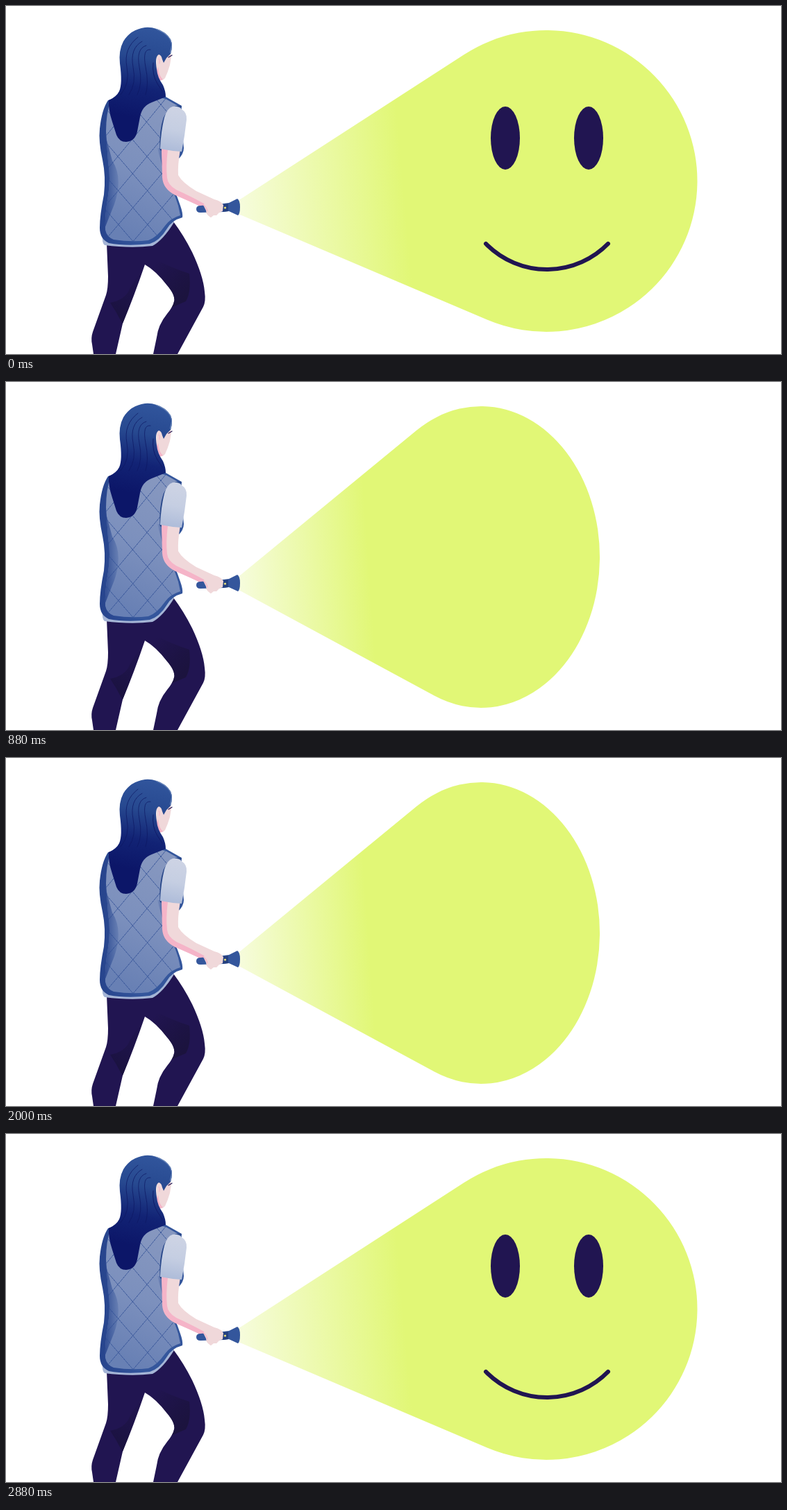
Animation of 1116x502 px, one loop 3.84 s. Source, as an HTML page with a canvas:

```html
<!DOCTYPE html>
<html lang="en">
<head>
<meta charset="utf-8">
<title>Torch</title>
<style>
html, body { margin: 0; width: 100%; height: 100%; overflow: hidden; background: #fff; }
canvas { display: block; }
</style>
</head>
<body>
<canvas id="stage" width="1116" height="502"></canvas>
<script>
const LOOP = 3840, STEP = 40;
const NAVY = '#211551', BLUE = '#34569c', LIME = '#e1f776', SKIN = '#f0d8da', PINK = '#f5b4c8';
const LENS = 337;
const stage = document.getElementById('stage');
const ctx = stage.getContext('2d');

function ramp(g, x0, y0, x1, y1, ...stops) {
  const r = g.createLinearGradient(x0, y0, x1, y1);
  stops.forEach((c, i) => r.addColorStop(i / (stops.length - 1), c));
  return r;
}

function fill(g, d, paint) {
  g.fillStyle = paint;
  g.fill(new Path2D(d));
}

function line(g, d, paint, width) {
  g.strokeStyle = paint;
  g.lineWidth = width;
  g.stroke(new Path2D(d));
}

function within(g, d, draw) {
  g.save();
  g.clip(new Path2D(d));
  draw();
  g.restore();
}

function drawLegs(g) {
  const legs = 'M145 342L147 390Q147 408 144 417L125 470Q122 479 124 488L126 502H158L168 458' +
    'Q184 420 200 373Q216 382 232 403Q244 417 242 426Q241 433 232 444Q219 460 217 478L212 502' +
    'H247L284 434Q288 426 286 412Q284 389 268 355Q256 331 241 311L206 338Z';
  fill(g, legs, NAVY);
  within(g, legs, () => {
    fill(g, 'M216 366Q239 378 264 386Q267 412 259 426L238 435L243 424Q231 397 200 373Z',
      ramp(g, 210, 375, 260, 425, 'rgba(24,17,56,0)', '#1b133d'));
    fill(g, 'M200 373L168 459Q160 443 150 428Q172 424 178 408Z',
      ramp(g, 192, 375, 160, 450, 'rgba(27,18,66,0)', '#1a123f'));
  });
}

function drawVest(g) {
  const vest = 'M147 136Q138 149 135 177Q133 195 139 222Q144 246 141 272Q135 302 135 320' +
    'Q135 336 148 342Q174 347 207 343Q221 339 232 321Q239 309 254 305Q255 299 251 288' +
    'Q244 266 232 246L247 222Q256 214 256 205L252 160L253 144L230 131L190 122Z';
  const panel = 'M151 135Q144 155 144 181L147 224Q151 249 147 274Q142 303 143 323' +
    'Q145 333 155 337Q181 341 205 338Q217 334 229 317Q237 306 251 302' +
    'L248 288Q240 262 228 242L223 205Q222 174 231 155Q238 145 251 146L230 134L192 126Z';

  fill(g, 'M139 331Q138 342 142 345Q180 350 211 346Q226 338 242 312L236 309Z', '#a5b5d6');
  fill(g, vest, ramp(g, 134, 0, 255, 0, '#26438c', BLUE, BLUE));
  fill(g, panel, ramp(g, 145, 315, 225, 150, '#6880b4', '#7c90bd', '#8697bf'));
  within(g, panel, () => {
    fill(g, 'M140 175L153 223Q169 248 156 286L140 326Z',
      ramp(g, 142, 0, 169, 0, 'rgba(36,65,139,.85)', 'rgba(52,86,156,0)'));
    fill(g, 'M218 205H231L230 250Z',
      ramp(g, 217, 0, 230, 0, 'rgba(52,86,156,0)', '#304e98'));
    g.setLineDash([2, 1.5]);
    for (let x = -90; x < 310; x += 42) {
      line(g, `M${x} 120Q${x + 98} 235 ${x + 198} 350`, '#304f95', 1);
      line(g, `M${x + 205} 120Q${x + 120} 225 ${x + 12} 350`, '#304f95', 1);
    }
    g.setLineDash([]);
  });
  line(g, 'M251 145Q236 145 228 162Q222 179 223 207', '#284789', 3);
}

function drawArm(g) {
  fill(g, 'M224 202L251 207Q247 230 248 244Q254 255 274 267L300 279Q309 281 313 287L312 296' +
    'L306 298L303 302L298 302L295 305Q287 299 284 291Q263 281 244 272Q227 264 226 249Z', SKIN);
  fill(g, 'M224 205L233 207Q230 232 232 248Q233 258 245 265Q267 275 285 285L291 292L284 291' +
    'Q265 282 244 273Q226 264 225 247Z', PINK);
  fill(g, 'M240 145Q249 144 253 149Q261 154 260 164L257 187L253 210Q237 209 222 206' +
    'Q223 181 228 161Q232 147 240 145Z', ramp(g, 246, 149, 235, 208, '#cdd3e4', '#c5cee2', '#aebcd9'));
}

function drawTorch(g) {
  fill(g, 'M280 288L313 285L321 284L333 278Q337 280 337 290Q337 300 334 302L321 296L313 297L280 298' +
    'Q274 298 274 293Q274 288 280 288Z', BLUE);
  fill(g, 'M312 286L320 285V296L312 297Z', '#25407f');
  fill(g, 'M284 287Q291 279 302 280Q310 282 313 287L312 296L307 298L303 302L299 302L295 305' +
    'Q288 301 288 295Z', SKIN);
  line(g, 'M283 286Q289 290 290 296', PINK, 1.2);
  g.fillStyle = '#e9e27d';
  g.beginPath();
  g.arc(315.5, 291, 1.6, 0, 7);
  g.fill();
}

function drawHead(g) {
  fill(g, 'M217 68L237 66L238 73L236 85Q233 96 229 104Q225 109 221 106L216 92Z', SKIN);
  fill(g, 'M219 88Q220 101 226 106L221 108L216 95Z', PINK);
  const hair = 'M200 31Q179 34 169 51Q162 64 164 83Q168 112 163 123Q159 131 148 136' +
    'Q147 149 153 167L159 186Q163 196 173 196Q186 195 189 181L193 160Q196 144 210 139L230 131' +
    'Q230 123 226 114Q218 103 217 91Q214 73 220 70Q224 71 225 77L227 82L231 75L237 69' +
    'Q241 57 237 48Q230 37 217 33Q208 30 200 31Z';
  fill(g, hair, ramp(g, 205, 31, 180, 160, '#31559c', '#274990', '#122375', '#0c1668'));
  within(g, hair, () => {
    line(g, 'M217 33Q239 42 239 57L237 67', '#6885b9', 2);
    for (let i = 0; i < 4; i++) {
      const x = 172 + i * 9;
      line(g, `M${190 + i * 6} ${45 + i * 6}Q${x - 3} 61 ${x + 2} 88Q${x + 7} 112 ${x - 7 + i * 3} 128`,
        'rgba(13,24,99,.7)', 1);
    }
    line(g, 'M212 82Q210 99 218 112L225 123', '#101b68', 1);
  });
  line(g, 'M234 74L239 71', NAVY, 1.3);
  line(g, 'M220 76Q222 78 221 83', PINK, 1);
}

function drawWoman() {
  const layer = document.createElement('canvas');
  layer.width = stage.width;
  layer.height = stage.height;
  const g = layer.getContext('2d');
  g.lineCap = 'round';
  [drawLegs, drawVest, drawArm, drawTorch, drawHead].forEach(draw => draw(g));
  return layer;
}

// Tangent point from the lens edge to the round end, in unscaled space.
function tangent(y, side) {
  const dx = 441, dy = 252.5 - y, r = 217.5;
  const dist = Math.hypot(dx, dy);
  const angle = Math.atan2(dy, dx) + side * Math.asin(r / dist);
  const reach = Math.sqrt(dist * dist - r * r);
  return [reach * Math.cos(angle), y + reach * Math.sin(angle)];
}

function drawBeam(scale) {
  const top = tangent(279, -1), bottom = tangent(301, 1);
  ctx.save();
  ctx.translate(LENS, 0);
  ctx.scale(scale, 1);
  ctx.fillStyle = ramp(ctx, 0, 290, 236, 269, '#f6fcdc', LIME);
  ctx.beginPath();
  ctx.moveTo(-2, 280);
  ctx.lineTo(0, 279);
  ctx.lineTo(...top);
  ctx.arc(441, 252.5, 217.5, Math.atan2(top[1] - 252.5, top[0] - 441),
    Math.atan2(bottom[1] - 252.5, bottom[0] - 441));
  ctx.lineTo(0, 301);
  ctx.lineTo(-2, 300);
  ctx.fill();
  ctx.restore();
}

function drawFace(alpha) {
  ctx.save();
  ctx.globalAlpha = alpha;
  ctx.fillStyle = ctx.strokeStyle = NAVY;
  for (const x of [719, 839]) {
    ctx.beginPath();
    ctx.ellipse(x, 190.5, 21, 45.5, 0, 0, 7);
    ctx.fill();
  }
  const half = Math.asin(88 / 123);
  ctx.lineWidth = 6;
  ctx.lineCap = 'round';
  ctx.beginPath();
  ctx.arc(779, 257, 123, Math.PI / 2 - half, Math.PI / 2 + half);
  ctx.stroke();
  ctx.restore();
}

const clamp = v => Math.min(1, Math.max(0, v));
const woman = drawWoman();

function frame(now) {
  const t = Math.floor(now % LOOP / STEP) * STEP;
  // The return mirrors the way out around 1440 ms.
  const p = Math.min(t, Math.max(0, 2880 - t));
  ctx.fillStyle = '#fff';
  ctx.fillRect(0, 0, stage.width, stage.height);
  drawBeam(1 - 0.384 * clamp((p - 480) / 720));
  drawFace(1 - clamp(p / 480));
  ctx.drawImage(woman, 0, 0);
  requestAnimationFrame(frame);
}
frame(performance.now());
</script>
</body>
</html>
```
